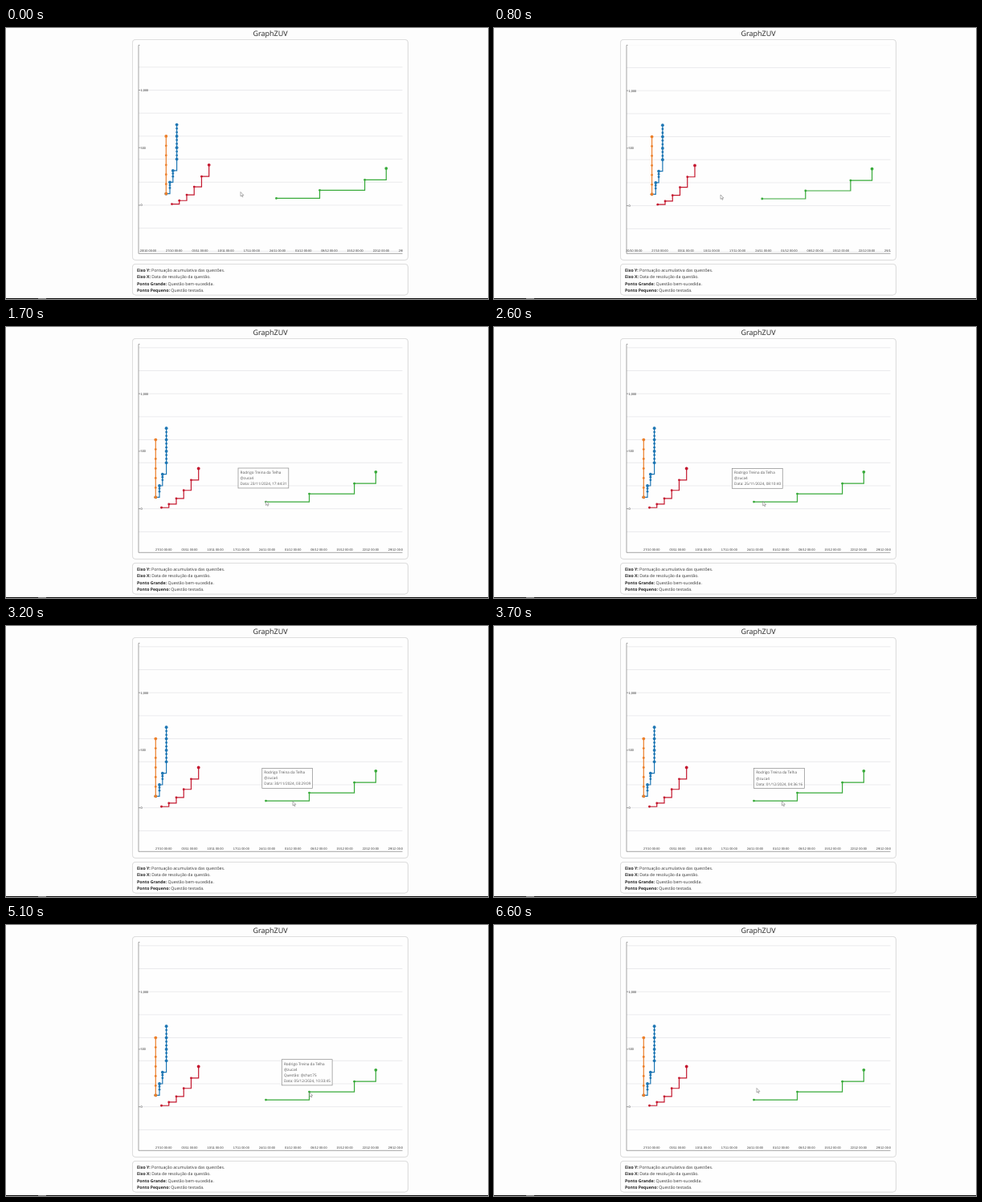
Recreate the animation shown at these times as an HTML page. Size 600 by 338 pixels, loop 7.6 s.

```html
<!DOCTYPE html>
<html lang="pt-BR">
<head>
<meta charset="utf-8">
<title>GraphZUV</title>
<style>
  html, body { margin: 0; width: 100%; height: 100%; overflow: hidden; background: #fdfdfd; }
  svg { display: block; width: 100vw; height: 100vh; }
  text { font-family: "Open Sans", "Noto Sans", sans-serif; text-rendering: geometricPrecision; fill: #333; white-space: pre; }
  .title { font-size: 9px; text-anchor: middle; fill: #222; }
  .legend { font-size: 5.2px; }
  .legend tspan { font-weight: 700; fill: #222; }
  .axis text { font: 3.85px "Liberation Sans", Arial, sans-serif; fill: #333; }
  .card { fill: #fefefe; stroke: #cfcfcf; stroke-width: .6; filter: drop-shadow(0 .6px .5px rgba(0, 0, 0, .18)); }
  .grid { stroke: #e2e2e6; stroke-width: .7; }
  .line { stroke: #808080; stroke-width: .7; fill: none; }
  #tip rect { fill: #fefefe; stroke: #8a8a8a; stroke-width: .7; }
  #tip text { font-size: 4.65px; fill: #555; }
</style>
</head>
<body>
<svg viewBox="0 0 600 338" preserveAspectRatio="none">
  <defs>
    <clipPath id="plot"><rect x="164.5" y="21" width="329.5" height="260.5"/></clipPath>
  </defs>
  <text class="title" x="329" y="10.4">GraphZUV</text>
  <rect class="card" x="157.4" y="14.4" width="343" height="275" rx="4"/>
  <rect class="card" x="157.4" y="294.4" width="343" height="38.6" rx="4"/>
  <g id="legend" class="legend"></g>
  <g clip-path="url(#plot)">
    <g id="grid" class="grid"></g>
    <g id="yAxis" class="axis"></g>
    <g id="xAxis" class="axis" text-anchor="middle"></g>
  </g>
  <path class="line" d="M166.5 21.4H165V281.3H493.5"/>
  <g id="series"></g>
  <g id="tip"><rect width="62.8"/></g>
  <path id="cursor" d="M0 0V5.4L1.3 4.3L2.2 6.3L3 5.9L2.2 4H3.9Z" fill="#fff" stroke="#666" stroke-width=".5"/>
  <path d="M0 337.5H600" stroke="#0c0c0c"/>
  <path d="M40 337.5H50" stroke="#777"/>
</svg>
<script>
const LOOP = 7600, STEP = 100, DAY = 864e5;
const WEEK_X = 32.2, FIRST_WEEK_X = 177;
const $ = id => document.getElementById(id);
const scoreY = score => 221 - score * 0.1435;
const range = (n, fn) => Array.from({ length: n }, (_, i) => fn(i));
const move = (el, x, y) => el.setAttribute('transform', `translate(${x} ${y})`);

function add(parent, tag, attrs, content = '') {
  const el = document.createElementNS('http://www.w3.org/2000/svg', tag);
  for (const k in attrs) el.setAttribute(k, attrs[k]);
  el.textContent = content;
  parent.append(el);
  return el;
}

[['Eixo Y:', 'Pontuação acumulativa das questões.'],
 ['Eixo X:', 'Data de resolução da questão.'],
 ['Ponto Grande:', 'Questão bem-sucedida.'],
 ['Ponto Pequeno:', 'Questão testada.']].forEach(([name, meaning], i) => {
  const row = add($('legend'), 'text', { x: 163, y: 304.2 + i * 8.18 });
  add(row, 'tspan', {}, name);
  row.append(' ' + meaning);
});

for (let score = -400; score <= 1400; score += 200)
  add($('grid'), 'path', { d: `M165 ${scoreY(score)}H493.5` });

for (const score of [0, 500, 1000]) {
  const y = scoreY(score);
  add($('yAxis'), 'path', { class: 'line', d: `M165 ${y}h2` });
  add($('yAxis'), 'text', { x: 167.6, y: y + 1.4 }, score.toLocaleString('en'));
}

const weeks = range(11, i => {
  const date = new Date(Date.UTC(2024, 9, 20) + i * 7 * DAY).toISOString();
  const x = FIRST_WEEK_X + i * WEEK_X;
  return { x, el: add($('xAxis'), 'text', { x, y: 278.6 }, `${date.slice(8, 10)}/${date.slice(5, 7)} 00:00`) };
});

// Evenly spaced attempts on one day.
const climb = (x, from, to, n) => range(n + 1, i => [x, from + (to - from) * i / n]);

// Full hundreds and the last point of a series get a large dot.
function drawSeries(color, points) {
  const d = 'M' + points[0].map((v, i) => i ? scoreY(v) : v) +
    points.map(([x, score]) => `H${x}V${scoreY(score)}`).join('');
  add($('series'), 'path', { d, fill: 'none', stroke: color, 'stroke-width': 1.2 });
  points.forEach(([x, score], i) => {
    const large = score % 100 === 0 || i === points.length - 1;
    add($('series'), 'circle', { cx: x, cy: scoreY(score), r: large ? 1.9 : 1.4, fill: color });
  });
}

drawSeries('#1f77b4', [[199.3, 100], ...climb(204, 150, 200, 2), ...climb(207.8, 250, 300, 2), ...climb(212.6, 400, 700, 9)]);
drawSeries('#ec7f2a', climb(199.3, 100, 600, 6));
drawSeries('#c4182f', range(6, i => [206.5 + 9.24 * i, Math.min(350, 10 * (i + 1) ** 2)]));
drawSeries('#38aa3a', [[336.5, 60], [390.5, 130], [446.6, 220], [473.3, 320]]);

const tipLines = range(4, i => add($('tip'), 'text', { x: 2.6, y: 6.9 + i * 7.05 }));

const PAN_START = 700, PAN_TIME = 900;
const TIP_IN = 1700, ON_POINT = 4700, TIP_OUT = 6500;
const TIP_LAG = 100, TIP_DX = -34.5, TIP_DY = -41;
const LINE_START = { x: 323.5, date: Date.UTC(2024, 10, 23, 17, 44, 31) };
const LINE_END = { x: 376.823, date: Date.UTC(2024, 11, 5, 5, 3, 4) };

// Pointer stops: time, x, y.
const stops = [
  [700, 292, 204.5], [800, 282, 208], [1100, 272, 212.5],
  [1600, LINE_START.x, 217], [2300, LINE_START.x, 217],
  [3200, 357, 218.6], [3900, 359, 218.6],
  [4300, LINE_END.x, 218.5], [4500, LINE_END.x, 218.5],
  [4800, 377.8, 208.7], [6300, 377.8, 208.7], [6600, 327, 203.5]
];

function pointerAt(t) {
  const next = stops.findIndex(s => s[0] > t);
  if (next === 0) return stops[0].slice(1);
  if (next < 0) return stops[stops.length - 1].slice(1);
  const [t0, x0, y0] = stops[next - 1], [t1, x1, y1] = stops[next];
  const f = (t - t0) / (t1 - t0);
  return [x0 + (x1 - x0) * f, y0 + (y1 - y0) * f];
}

function dateAt(x) {
  const f = (x - LINE_START.x) / (LINE_END.x - LINE_START.x);
  const ms = LINE_START.date + f * (LINE_END.date - LINE_START.date);
  const [day, time] = new Date(ms).toISOString().split('T');
  return `${day.split('-').reverse().join('/')}, ${time.slice(0, 8)}`;
}

function drawTip(t) {
  const visible = t >= TIP_IN && t < TIP_OUT;
  $('tip').style.display = visible ? '' : 'none';
  if (!visible) return;
  const [x, y] = pointerAt(t - TIP_LAG);
  const lines = ['Rodrigo Treina da Telha', '@zuca4'];
  if (t >= ON_POINT) lines.push('Questão: @chat:75', 'Data: 05/12/2024, 10:33:45');
  else lines.push('Data: ' + dateAt(x));
  tipLines.forEach((el, i) => el.textContent = lines[i] || '');
  $('tip').firstElementChild.setAttribute('height', 3.2 + lines.length * 7.25);
  move($('tip'), x + TIP_DX, y + TIP_DY);
}

function draw(t) {
  const u = Math.min(1, Math.max(0, (t - PAN_START) / PAN_TIME));
  const dx = -13 * (1 - (1 - u) ** 2), dy = 5.7 * u;
  move($('grid'), 0, dy);
  move($('yAxis'), 0, dy);
  move($('xAxis'), dx, 0);
  move($('series'), dx, dy);
  weeks.forEach(w => w.el.style.display = w.x + dx < 165 ? 'none' : '');
  move($('cursor'), ...pointerAt(t));
  drawTip(t);
}

const start = performance.now();
function tick() {
  const t = (performance.now() - start) % LOOP;
  draw(Math.floor(t / STEP) * STEP);
  requestAnimationFrame(tick);
}
tick();
</script>
</body>
</html>
```
